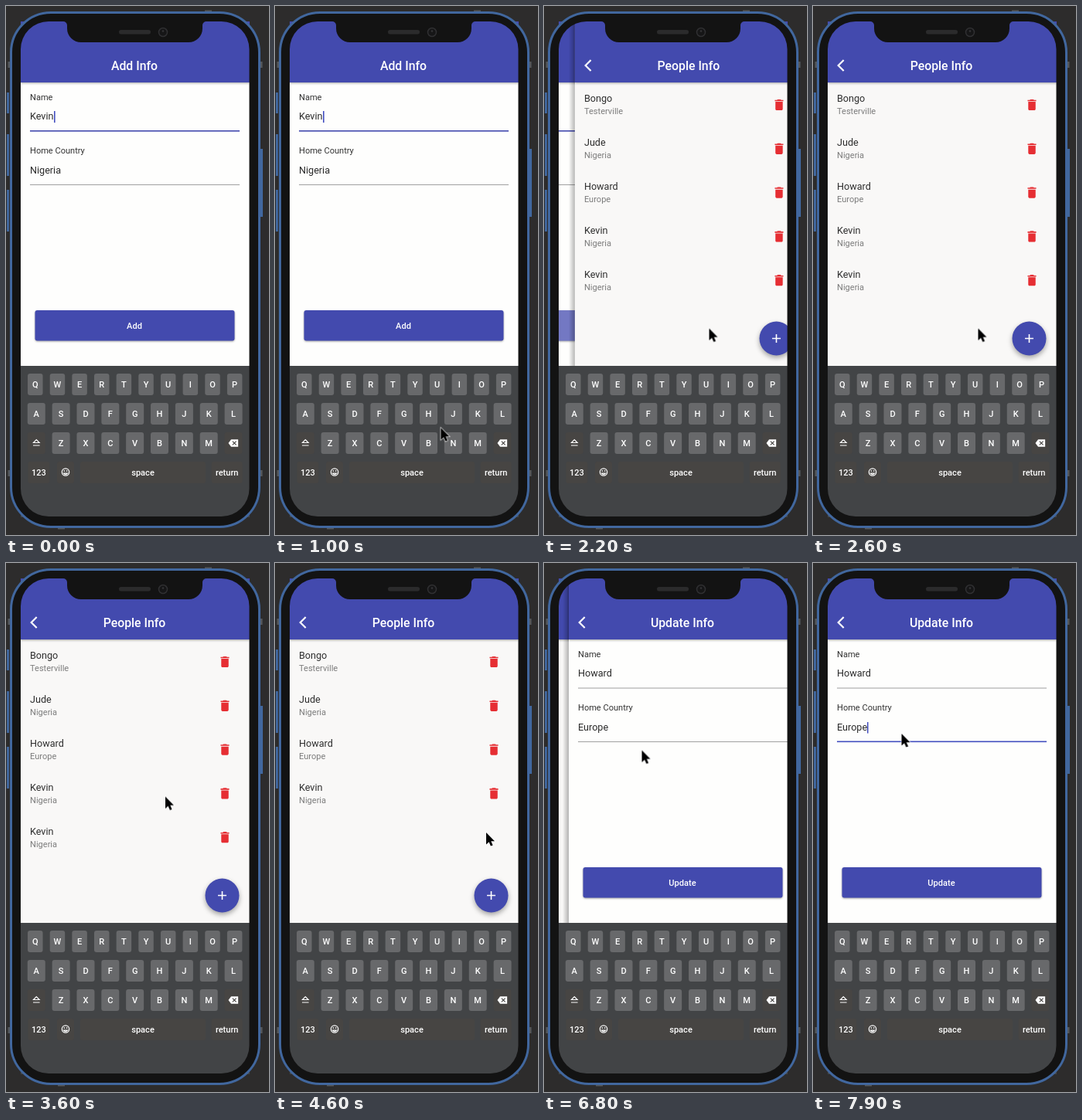
An HTML page that plays this animation: 340 px wide and 685 px high, repeating every 8 s.

```html
<!DOCTYPE html>
<html lang="en">
<head>
<meta charset="utf-8">
<title>People Info</title>
<style>
html, body { margin: 0; width: 100%; height: 100%; overflow: hidden; background: #2d2c2c; }
svg { display: block; width: 340px; height: 685px; font-family: Roboto, sans-serif; }
.m { font-weight: 500; }
.bar { fill: #434aae; filter: drop-shadow(0 1.5px 1.5px rgba(0,0,0,.35)); }
.btn { fill: #434aae; filter: drop-shadow(0 1.5px 1.2px rgba(0,0,0,.35)); }
.fab { fill: #434aae; filter: drop-shadow(0 3px 3px rgba(0,0,0,.35)); }
.caret { fill: #434fc0; }

/* The clock moves in 100 ms steps: all animations are paused and placed by --t. */
#add, #people, #update, #mouse, #gone, #press, #blink, .focus {
  animation: 8s linear calc(var(--t, 0) * -1ms) infinite paused;
}
#add { animation-name: add; }
#people { animation-name: people; }
#update { animation-name: update; }
#mouse { animation-name: mouse; }
#gone { animation-name: gone; }
#press { animation-name: press; }
#blink { animation-name: blink; }
.focus { animation-name: focus; }

@keyframes add {
  0%, 24.25% { transform: none; animation-timing-function: cubic-bezier(.35,.91,.33,.97); }
  30.5%, 100% { transform: translateX(-98.7px); }
}
@keyframes people {
  0%, 24.24% { transform: translateX(330px); }
  24.25% { transform: translateX(296px); animation-timing-function: cubic-bezier(.35,.91,.33,.97); }
  30.5%, 84.99% { transform: translateX(0); }
  85% { transform: translateX(-94.4px); animation-timing-function: ease-out; }
  90%, 100% { transform: translateX(-98.7px); }
}
@keyframes update {
  0%, 84.99% { transform: translateX(330px); }
  85% { transform: translateX(13px); animation-timing-function: ease-out; }
  90%, 100% { transform: translateX(0); }
}
@keyframes mouse {
  0%, 6.25% { transform: translate(222px, 690px); }
  16.25% { transform: translate(210px, 460px); animation-timing-function: ease-out; }
  21.25%, 36.25% { transform: translate(213.5px, 417.5px); }
  40%, 41.25% { transform: translate(160px, 430px); }
  45% { transform: translate(206px, 302.5px); animation-timing-function: ease-out; }
  50%, 61.25% { transform: translate(273px, 349px); }
  71.25% { transform: translate(152.5px, 279.5px); }
  72.5% { transform: translate(132px, 255px); }
  75%, 85% { transform: translate(126.5px, 242.5px); }
  90%, 100% { transform: translate(114.5px, 221px); }
}
@keyframes gone {
  0%, 54.99% { visibility: visible; }
  55%, 100% { visibility: hidden; }
}
@keyframes press {
  0%, 23.5% { opacity: 0; }
  27%, 100% { opacity: .26; }
}
@keyframes blink {
  0%, .6%, 8.75%, 13.1%, 21.25%, 100% { opacity: 1; }
  3.75%, 6.25%, 16.25%, 18.75% { opacity: 0; }
}
@keyframes focus {
  0%, 94.99% { opacity: 0; }
  95%, 100% { opacity: 1; }
}
</style>
</head>
<body>
<svg viewBox="0 0 340 685">
  <defs>
    <clipPath id="screen"><rect x="19" y="20" width="296" height="446"/></clipPath>
    <linearGradient id="edge">
      <stop offset="0" stop-opacity="0"/>
      <stop offset="1" stop-opacity=".28"/>
    </linearGradient>
    <path id="bin" fill="#e62e33" transform="scale(.789) translate(-12 -12)"
      d="M6 19c0 1.1.9 2 2 2h8c1.1 0 2-.9 2-2V7H6zM19 4h-3.5l-1-1h-5l-1 1H5v2h14z"/>
  </defs>

  <g clip-path="url(#screen)">
    <g id="add"></g>
    <g id="people"></g>
    <g id="update"></g>
  </g>
  <g id="keys"></g>

  <g fill="#41679e">
    <path d="M1 112h3v27h-3zM1 166h3v54h-3zM1 238h3v54h-3zM329 185h3v88h-3z"/>
    <path fill="#55585c" d="M257 5.500h9v2h-9zM2.500 72h3v8h-3zM328.500 72h3v8h-3zM2.500 601h3v8h-3zM328.500 601h3v8h-3zM67 675.500h9v2h-9z"/>
  </g>
  <path fill="#131313" fill-rule="evenodd" d="M58 8H276a51 51 0 0 1 51 51V623a51 51 0 0 1-51 51H58a51 51 0 0 1-51-51V59a51 51 0 0 1 51-51Z
    M55 20H74a5 5 0 0 1 5 5V29a18 18 0 0 0 18 18H236a18 18 0 0 0 18-18V25a5 5 0 0 1 5-5H278.500a36 36 0 0 1 36 36V625a36 36 0 0 1-36 36H55a36 36 0 0 1-36-36V56a36 36 0 0 1 36-36Z"/>
  <rect x="6.500" y="8.500" width="321" height="666" rx="51.500" fill="none" stroke="#41679e" stroke-width="3"/>
  <rect x="146" y="31" width="41" height="5.500" rx="2.750" fill="#2b2b2c"/>
  <circle cx="203" cy="34" r="5.500" fill="#161617" stroke="#303032" stroke-width="1.500"/>
  <circle cx="203" cy="32.500" r="1.300" fill="#343437"/>

  <path id="mouse" d="M0 0V15.500L3.600 12.200 5.900 17.600 8.600 16.400 6.300 11.200H11Z" stroke="#fff" stroke-width="1.200" paint-order="stroke"/>
</svg>
<script>
const $ = id => document.getElementById(id);
const S = 11.05, M = 12.62, L = 15.8;

// Text placed by the middle of its capitals
const text = (s, x, y, size, fill, more = '') =>
  `<text x="${x}" y="${y + size * .355}" font-size="${size}" fill="${fill}" ${more}>${s}</text>`;
const mid = (s, x, y, size) => text(s, x, y, size, '#fff', 'class="m" text-anchor="middle"');
const rect = (x, y, w, h, fill, more = '') =>
  `<rect x="${x}" y="${y}" width="${w}" height="${h}" fill="${fill}" ${more}/>`;

const back = '<path d="M39.700 70 32.700 77l7 7" fill="none" stroke="#fff" stroke-width="2.200"/>';

const page = (title, bg, body, top = '') =>
  rect(11, 20, 8, 446, 'url(#edge)') + rect(19, 20, 296, 446, bg) + body +
  rect(19, 20, 296, 79, '#434aae', 'class="bar"') + mid(title, 166, 77, L) + top;

const form = (name, country) =>
  text('Name', 31, 118, S, '#333') + text(name, 31, 143, M, '#2b2b2b') +
  text('Home Country', 31, 187, S, '#333') + text(country, 31, 213, M, '#2b2b2b') +
  rect(31, 231, 271, 1, '#a0a0a0');

const button = (label, over = '') =>
  rect(37.5, 394, 258, 39.5, '#434aae', 'rx="3" class="btn"') + over + mid(label, 166, 414, S);

const row = ([name, place], i) => {
  const y = 56.8 * i;
  return `<g ${i == 4 ? 'id="gone"' : ''}>` +
    text(name, 31, 120 + y, M, '#2e2e2e') + text(place, 31, 136.5 + y, S, '#7d7d7d') +
    `<use href="#bin" x="283" y="${128 + y}"/></g>`;
};

$('add').innerHTML = page('Add Info', '#fefefd',
  form('Kevin', 'Nigeria') + rect(31, 161, 271, 1.6, '#434aae') +
  rect(62, 136, 1.6, 15, '', 'id="blink" class="caret"') +
  button('Add', rect(37.5, 394, 258, 39.5, '#fff', 'rx="3" id="press"')));

const people = [['Bongo', 'Testerville'], ['Jude', 'Nigeria'], ['Howard', 'Europe'], ['Kevin', 'Nigeria'], ['Kevin', 'Nigeria']];
$('people').innerHTML = page('People Info', '#f9f8f7',
  people.map(row).join('') + '<circle cx="279.500" cy="430.500" r="22" class="fab"/>' +
  '<path d="M274 430.500h11M279.500 425v11" stroke="#fff" stroke-width="1.600"/>', back);

$('update').innerHTML = page('Update Info', '#fefefd',
  form('Howard', 'Europe') + rect(31, 161.5, 271, 1, '#a0a0a0') +
  `<g class="focus">${rect(31, 230.5, 271, 1.6, '#434fc0')}${rect(70, 206, 1.5, 14.5, '', 'class="caret"')}</g>` +
  button('Update'), back);

const key = (x, y, w, label = '', fill = '#68696b') =>
  rect(x - w / 2, y - 14, w, 28, fill, 'rx="3"') + mid(label, x, y, S);
const line = (letters, x, y, step, w) =>
  [...letters].map((c, i) => key(x + i * step, y, w, c)).join('');
const dark = '#474543';

$('keys').innerHTML = rect(19, 466, 296, 196, '#424446') +
  line('QWERTYUIOP', 37.8, 490, 28.65, 19.5) +
  line('ASDFGHJKL', 39.3, 528, 31.85, 23) +
  line('ZXCVBNM', 71.1, 566, 31.85, 23) +
  key(39.3, 566, 23, '', dark) + key(294, 566, 23, '', dark) +
  key(42.3, 604, 28, '123', dark) + key(77, 604, 22, '', dark) +
  key(177, 604, 162, 'space', dark) + key(285.7, 604, 40, 'return', dark) +
  `<g fill="none" stroke="#fff" stroke-width="1.200">
    <path d="M35.500 565.500l3.800-3.800 3.800 3.800zM35 569h8.600"/>
    <circle cx="77" cy="603.500" r="4.700"/><path d="M74.500 605q2.500 3 5 0z"/>
    <path d="M74.600 602h1.500M77.900 602h1.500" stroke-width="1.500"/>
    <path d="M287.500 566l3.600-4.800h9v9.600h-9z" fill="#fff" stroke="none"/>
    <path d="M292.800 563.600l4.800 4.800m0-4.800l-4.800 4.800" stroke="${dark}"/>
  </g>`;

function tick() {
  const t = Math.floor(performance.now() % 8000 / 100) * 100;
  document.documentElement.style.setProperty('--t', t);
  requestAnimationFrame(tick);
}
tick();
</script>
</body>
</html>
```
